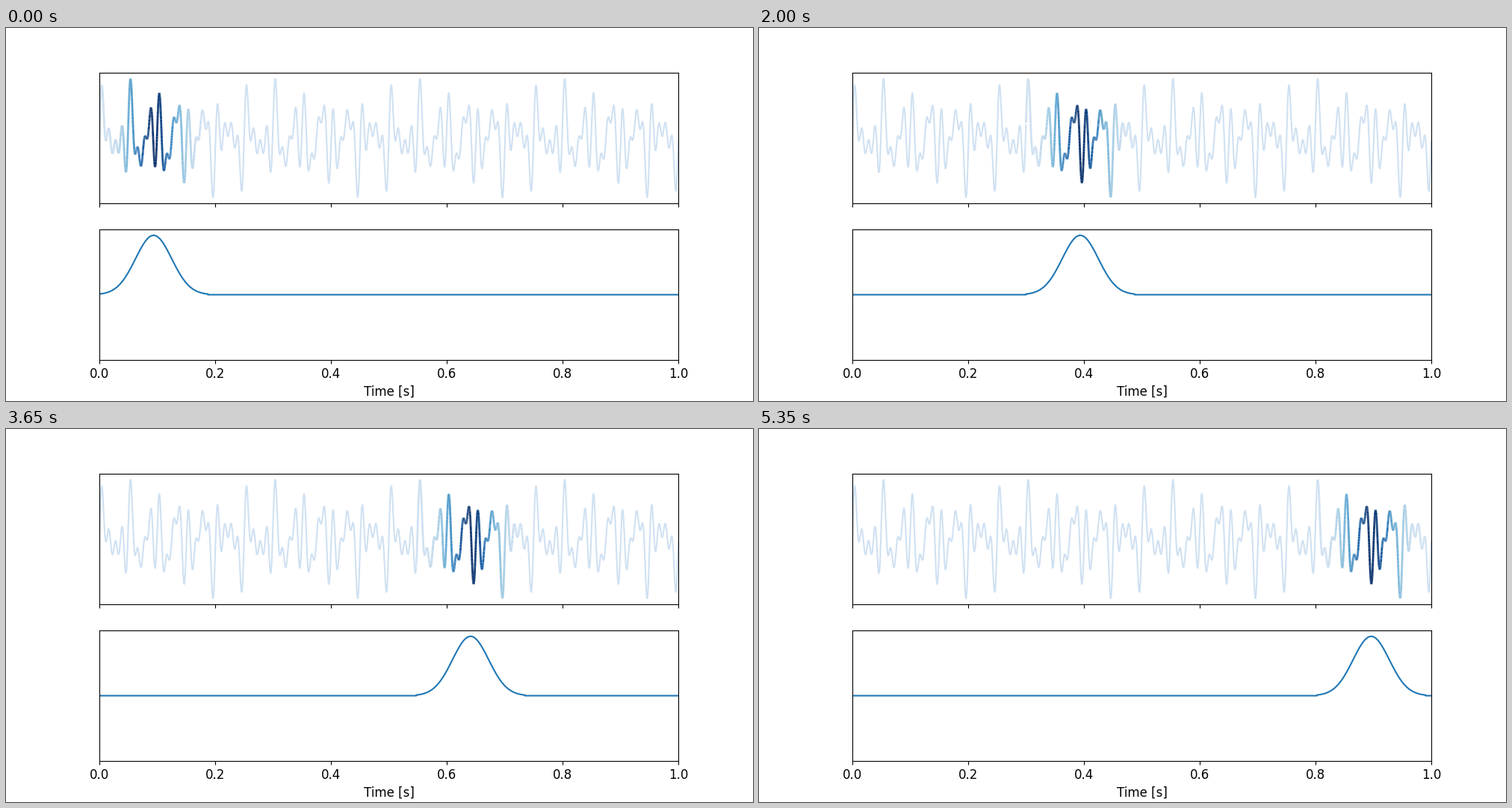
Write a matplotlib script that moves like this. It is 1000 px wide and 500 px high and loops after 5400 ms.

```python
import matplotlib.pyplot as plt
import numpy as np
from matplotlib.animation import FuncAnimation
from matplotlib.collections import LineCollection

plt.rcParams["font.family"] = "DejaVu Sans"
plt.rcParams["font.size"] = 12

RATE = 8000          # samples per second
WIDTH = 1500         # window length in samples
HOP = 60             # window shift per frame
FRAMES = 108
FREQS = (24, 40, 60, 80)

t = np.arange(RATE) / RATE
signal = sum(np.sin(2 * np.pi * f * t) for f in FREQS)
points = np.column_stack([t, signal])

offset = np.arange(WIDTH) - (WIDTH - 1) / 2
window = np.exp(-0.5 * (offset / (WIDTH / 6)) ** 2)

blues = plt.get_cmap("Blues")
pale = blues(0.2)

fig, (top, low) = plt.subplots(2, 1, sharex=True, figsize=(10, 5), dpi=100)
peak = 1.1 * np.abs(signal).max()
top.set(xlim=(0, 1), ylim=(-peak, peak), yticks=[])
low.set(ylim=(-1.1, 1.1), yticks=[], xlabel="Time [s]")

before, = top.plot([], [], color=pale, lw=1.5)
after, = top.plot([], [], color=pale, lw=1.5)
lit = LineCollection([], linewidths=2)
lit.set_colors(blues(0.2 + 0.8 * window[:-1]))
top.add_collection(lit, autolim=False)
curve, = low.plot([], [], color="#1f77b4", lw=1.5)


def update(i):
    a = i * HOP
    b = a + WIDTH
    before.set_data(t[:a], signal[:a])
    after.set_data(t[b:], signal[b:])
    part = points[a:b]
    lit.set_segments(np.stack([part[:-1], part[1:]], axis=1))
    level = np.zeros(RATE)
    level[a:b] = window
    curve.set_data(t, level)
    return before, after, lit, curve


anim = FuncAnimation(fig, update, frames=FRAMES, interval=50,
                     repeat=True, repeat_delay=0)
plt.show()
```
